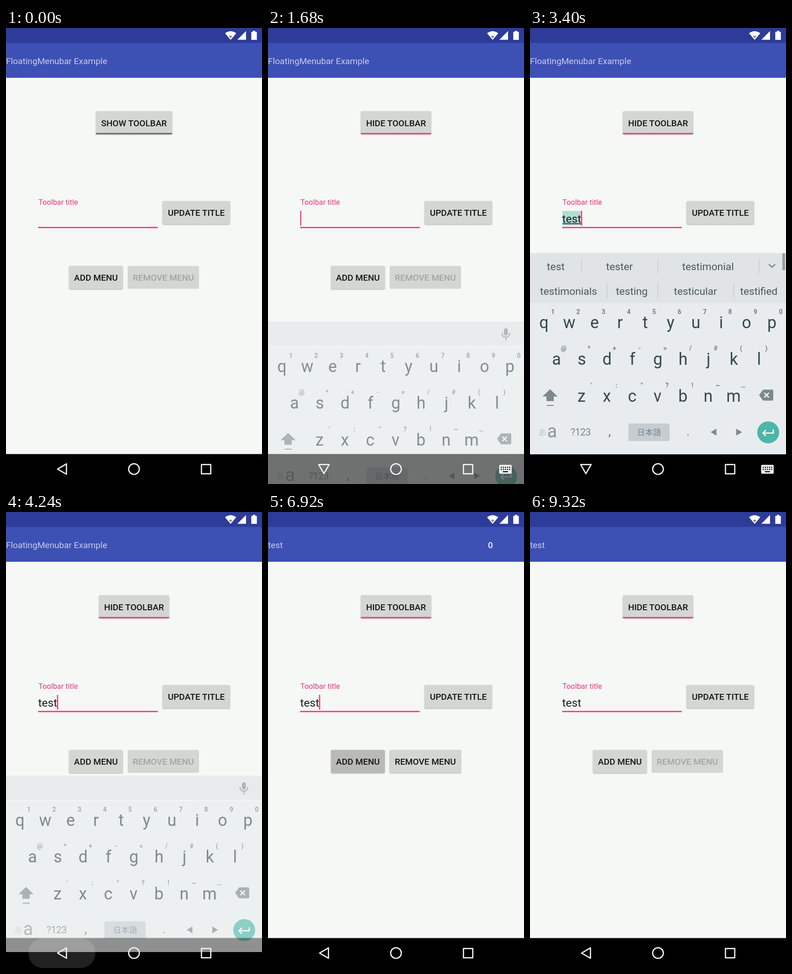
These frames come from a looping animation (561 by 998 pixels, 9.36 s). An HTML page:

```html
<!DOCTYPE html>
<html lang="en">
<head>
<meta charset="utf-8">
<title>Toolbar demo</title>
<style>
html, body { margin: 0; width: 100%; height: 100%; overflow: hidden; background: #f6f8f5; }
svg { display: block; width: 100%; height: 100%; font-family: Roboto, "Noto Sans CJK JP", "Noto Sans CJK", sans-serif; }
.mid { text-anchor: middle; }
.label { font-size: 19.1px; font-weight: 500; text-anchor: middle; }
.lift { filter: drop-shadow(0 1.4px 1.1px rgba(0,0,0,.32)); }
.key { font-size: 36px; fill: #37474f; text-anchor: middle; }
.hint { font-size: 14px; font-weight: 700; fill: #747e83; text-anchor: middle; }
.word { font-size: 22.8px; fill: #4a585f; text-anchor: middle; }
</style>
</head>
<body>
<svg id="stage" viewBox="0 0 561 998" xmlns="http://www.w3.org/2000/svg">
  <rect width="561" height="998" fill="#f6f8f5"/>
  <g id="content">
    <g id="buttons"></g>
    <text x="71" y="387" font-size="16.4" fill="#ec3583">Toolbar title</text>
    <rect id="mark" x="71" y="400.5" width="41.5" height="31.5" fill="#b2dcd5"/>
    <text id="entry" x="70.5" y="426" font-size="24.6" fill="#1c1d1c"></text>
    <rect id="rule" x="71" y="427.5" height="1.7" fill="#222"/>
    <rect id="caret" y="400" width="2.5" height="32.5" fill="#f2357f"/>
    <rect x="70.5" y="435.3" width="262" height="2.8" fill="#fb3482"/>
  </g>
  <g id="toolbar">
    <rect y="30" width="561" height="79" fill="#3d50b4"/>
    <text id="title" x="0" y="78.7" font-size="19.1" fill="#c8cde9"></text>
    <g fill="#f2f3fa" class="label">
      <text id="item0" y="78.5">0</text>
      <text id="item1" y="78.5">1</text>
    </g>
  </g>
  <rect width="561" height="32.8" fill="#2d3c99"/>
  <g fill="#fff">
    <path d="M480 11.5Q492.3 2.500 504.600 11.500L492.300 26Z"/>
    <path d="M488.500 18Q492.300 15.500 496 18L492.300 22.500Z" fill="#7f87a8"/>
    <path d="M507 25.700H526V6.500Z"/>
    <path d="M537.500 8.500H541V6.300H546.200V8.500H549.700V26H537.500Z"/>
  </g>
  <rect y="932.5" width="561" height="65.500" fill="#000"/>
  <rect id="under" y="932.5" width="561" fill="#f6f8f5"/>
  <g id="board"></g>
  <rect id="shade" y="932.5" width="561" fill="#000"/>
  <rect id="ripple" y="933" height="65" rx="32.500" fill="#fff"/>
  <g fill="none" stroke="#f0f0f0" stroke-width="2.700" stroke-linejoin="round">
    <path id="back"/>
    <circle cx="280.500" cy="965.300" r="11.700"/>
    <rect x="428.300" y="955.300" width="20.400" height="20.400"/>
  </g>
  <g id="imeIcon">
    <rect x="506.500" y="956" width="27.500" height="19.500" rx="2.500" fill="#f0f0f0"/>
    <path d="M510 961.500H531M510 966H531" stroke="#111" stroke-width="2.500" stroke-dasharray="2.500 2.100"/>
    <path d="M514.500 971H526" stroke="#111" stroke-width="2.300"/>
  </g>
</svg>
<script>
const LOOP = 9360, STEP = 40, BAR = 76.4;
const NS = "http://www.w3.org/2000/svg";
const $ = id => document.getElementById(id);

function add(parent, tag, attrs, text) {
  const el = document.createElementNS(NS, tag);
  for (const k in attrs) el.setAttribute(k, attrs[k]);
  if (text !== undefined) el.textContent = text;
  parent.appendChild(el);
  return el;
}
const set = (el, attrs) => { for (const k in attrs) el.setAttribute(k, attrs[k]); };
const show = (el, on) => el.setAttribute("visibility", on ? "inherit" : "hidden");

const clamp = x => Math.max(0, Math.min(1, x));
const ramp = (t, from, ms) => clamp((t - from) / ms);
const ease = p => (1 - Math.cos(Math.PI * p)) / 2;
const glide = (t, from, ms = 300) => ease(ramp(t, from, ms));

// Buttons
function makeButton(x, y, w, h, text) {
  const g = add($("buttons"), "g", {});
  const box = { x, y, width: w, height: h, rx: 2.7 };
  const face = add(g, "rect", { ...box, fill: "#d4d6d3", class: "lift" });
  const tint = add(g, "rect", { ...box, fill: "#000", opacity: 0 });
  const label = add(g, "text", { x: x + w / 2, y: y + 32.7, class: "label", fill: "#141514" }, text);
  return { face, tint, label };
}
const toggle = makeButton(197, 182, 167, 50.5, "");
const toggleBar = add($("buttons"), "rect", { y: 229.7, height: 2.8 });
const update = makeButton(343, 378.7, 148, 50.8, "UPDATE TITLE");
const addMenu = makeButton(138, 520.7, 118, 50.5, "ADD MENU");
const removeMenu = makeButton(266.5, 520.7, 156.5, 50, "REMOVE MENU");

// Touch tint: fades in, holds until release, fades out
const press = (t, down, up) => 0.13 * ramp(t, down, 200) * (1 - ramp(t, up, 350));

// Keyboard
const board = $("board");
add(board, "rect", { y: 601, width: 561, height: 332, fill: "#e8ecee" });

function keyRow(keys, hints, x, hintX, y) {
  [...keys].forEach((k, i) => {
    add(board, "text", { x: x + 55.5 * i, y, class: "key" }, k);
    add(board, "text", { x: hintX + 55.5 * i, y: y - 31, class: "hint" }, hints[i]);
  });
}
keyRow("qwertyuiop", "1234567890", 30.5, 50, 657);
keyRow("asdfghjkl", "@*+-=/#()", 58, 74, 737);
keyRow("zxcvbnm", "':\"?!~…", 113, 134, 818);

const grey = "#7b888e";
add(board, "path", { d: "M27.500 806.500L44 790.500L60.500 806.500H52V816.500H36V806.500ZM36.500 825H52V827H36.500Z", fill: grey });
add(board, "path", { d: "M502 803.500L510 792.500Q511 791.500 512 791.500H531Q533 791.500 533 793.500V813.500Q533 815.500 531 815.500H512Q511 815.500 510 814.500Z", fill: grey });
add(board, "path", { d: "M513.500 798.500L523.500 808.500M523.500 798.500L513.500 808.500", stroke: "#eef1f2", "stroke-width": 2.6 });
add(board, "text", { x: 27, y: 892, class: "mid", "font-size": 18.5, fill: "#bfc6c9" }, "あ");
add(board, "text", { x: 48.5, y: 896, class: "mid", "font-size": 40, fill: "#8b979c" }, "a");
add(board, "text", { x: 111, y: 892, class: "mid", "font-size": 21.5, "letter-spacing": -0.6, fill: grey }, "?123");
add(board, "text", { x: 174.5, y: 892, class: "mid", "font-size": 28, fill: "#66747b" }, ",");
add(board, "text", { x: 346.5, y: 892, class: "mid", "font-size": 24, fill: "#66747b" }, ".");
add(board, "rect", { x: 215.5, y: 865.5, width: 90.500, height: 38.500, rx: 3, fill: "#c6cdd1" });
add(board, "text", { x: 261, y: 891, class: "mid", "font-size": 17.5, fill: "#74828a" }, "日本語");
add(board, "path", { d: "M396 884.500L408.500 877V892ZM464.500 884.500L452 877V892Z", fill: grey });
add(board, "circle", { cx: 522, cy: 885, r: 24, fill: "#4cb6aa" });
add(board, "path", { d: "M533 879V886.500H511M517 880L510.500 886.500L517 893", fill: "none", stroke: "#fff", "stroke-width": 2.6 });

const plainStrip = add(board, "g", {});
add(plainStrip, "rect", { y: 547, width: 561, height: 54, fill: "#e0e4e6" });
add(plainStrip, "rect", { y: 600, width: 561, height: 2, fill: "#f3f5f6" });
add(plainStrip, "rect", { x: 517, y: 561.500, width: 8.500, height: 16, rx: 4.200, fill: "#868d91" });
add(plainStrip, "path", { d: "M512.700 571.500Q513 581 521.200 581T529.700 571.500M521.200 581V588", fill: "none", stroke: "#868d91", "stroke-width": 2.4 });

const wordStrip = add(board, "g", {});
add(wordStrip, "rect", { y: 492.500, width: 561, height: 109, fill: "#e0e4e4" });
add(wordStrip, "path", {
  d: [113, 280, 502].map(x => `M${x} 505V537`).join("") + [168.5, 280, 446.5].map(x => `M${x} 559V591`).join(""),
  stroke: "#c2c7c9", "stroke-width": 1.5
});
add(wordStrip, "path", { d: "M523.500 517L530.500 523.500L537.500 517", fill: "none", stroke: "#7b868b", "stroke-width": 2.4 });
add(wordStrip, "rect", { x: 553, y: 493, width: 6, height: 37, fill: "#999e9f" });
const words = [56.5, 196, 390, 84.5, 223, 362.5, 501.5].map((x, i) =>
  add(wordStrip, "text", { x, y: i < 3 ? 529.5 : 584, class: "word" }));

const typing = [
  [2480, "t", "the to that this they there then"],
  [2760, "te", "ten tell team teacher text term tested"],
  [3000, "tes", "test tests tested testing tester testify testified"],
  [3280, "test", "test tester testimonial testimonials testing testicular testified"]
];
const COMMIT = 3680;

function drawField(t) {
  const typed = typing.filter(s => t >= s[0]).pop();
  const composing = typed && t < COMMIT;
  const text = typed ? typed[1] : "";
  $("entry").textContent = text;
  const width = text ? $("entry").getComputedTextLength() : 0;
  show($("mark"), composing);
  show($("rule"), composing);
  set($("mark"), { width });
  set($("rule"), { width });
  const blink = typed ? (t < 4280 || (t + 220) % 1000 < 500) : (t + 780) % 1000 < 500;
  show($("caret"), blink);
  set($("caret"), { x: text ? 70 + width : 70.5 });

  show(plainStrip, !composing);
  show(wordStrip, composing);
  if (composing) typed[2].split(" ").forEach((w, i) => { words[i].textContent = w; });
}

function drawKeyboard(t) {
  const inP = ramp(t, 1640, 200), outP = ramp(t, 4160, 160);
  const leaving = t >= 4160;
  const drop = leaving ? 120 * outP ** 2 : 187 * (1 - inP) ** 3;
  const alpha = leaving ? 1 - outP ** 1.4 : 1 - (1 - inP) ** 4;
  const visible = alpha > 0;
  show(board, visible);
  set(board, { transform: `translate(0 ${drop})`, opacity: alpha });
  const height = visible ? Math.min(65.5, drop) : 0;
  set($("under"), { height });
  set($("shade"), { height, opacity: leaving ? 0.4 : 0.53 });

  const open = t >= 1640 && t < 4160;
  set($("back"), { d: open ? "M111 955.300H134L122.500 975.300Z" : "M113 965.300L132.500 954V976.600Z" });
  show($("imeIcon"), open);

  const grow = ramp(t, 4080, 140), half = 73.5 * (0.4 + 0.6 * grow);
  set($("ripple"), {
    x: 122.5 - half, width: 2 * half,
    opacity: 0.13 * grow * (1 - ramp(t, 4260, 280))
  });
}

function drawToolbar(t) {
  const hidden = glide(t, 20) - glide(t, 800);
  const shift = `translate(0 ${-BAR * hidden})`;
  set($("toolbar"), { transform: shift });
  set($("content"), { transform: shift });

  const renamed = t >= 4980;
  $("title").textContent = renamed ? "test" : "FloatingMenubar Example";
  set($("title"), { opacity: renamed ? ramp(t, 4980, 200) : 1 - ramp(t, 4820, 160) });

  const left = glide(t, 6746) - glide(t, 8200);
  set($("item0"), { x: 528.3 - 65.5 * left, opacity: glide(t, 6300) - glide(t, 8800) });
  set($("item1"), { x: 528.3, opacity: glide(t, 7046) - glide(t, 7900) });
}

function drawButtons(t) {
  const on = t >= 800;
  const x = on ? 203.7 : 197, width = 561 - 2 * x;
  toggle.label.textContent = on ? "HIDE TOOLBAR" : "SHOW TOOLBAR";
  set(toggle.face, { x, width });
  set(toggle.tint, { x, width, opacity: press(t, 440, 800) });
  set(toggleBar, { x, width, fill: on ? "#fb3482" : "#656765" });

  set(update.tint, { opacity: press(t, 4620, 4840) });
  set(addMenu.tint, { opacity: press(t, 5800, 6020) + press(t, 6600, 6930) });
  set(removeMenu.tint, { opacity: press(t, 7700, 7920) + press(t, 8640, 8820) });

  const enabled = t >= 6000 && t < 8800;
  set(removeMenu.label, { fill: enabled ? "#141514" : "#a3a5a2" });
  set(removeMenu.face, { class: enabled ? "lift" : "" });
}

function draw(t) {
  drawToolbar(t);
  drawButtons(t);
  drawField(t);
  drawKeyboard(t);
}

const start = performance.now();
function tick() {
  const t = (performance.now() - start) % LOOP;
  draw(Math.floor(t / STEP) * STEP);
  requestAnimationFrame(tick);
}
draw(0);
requestAnimationFrame(tick);
</script>
</body>
</html>
```
